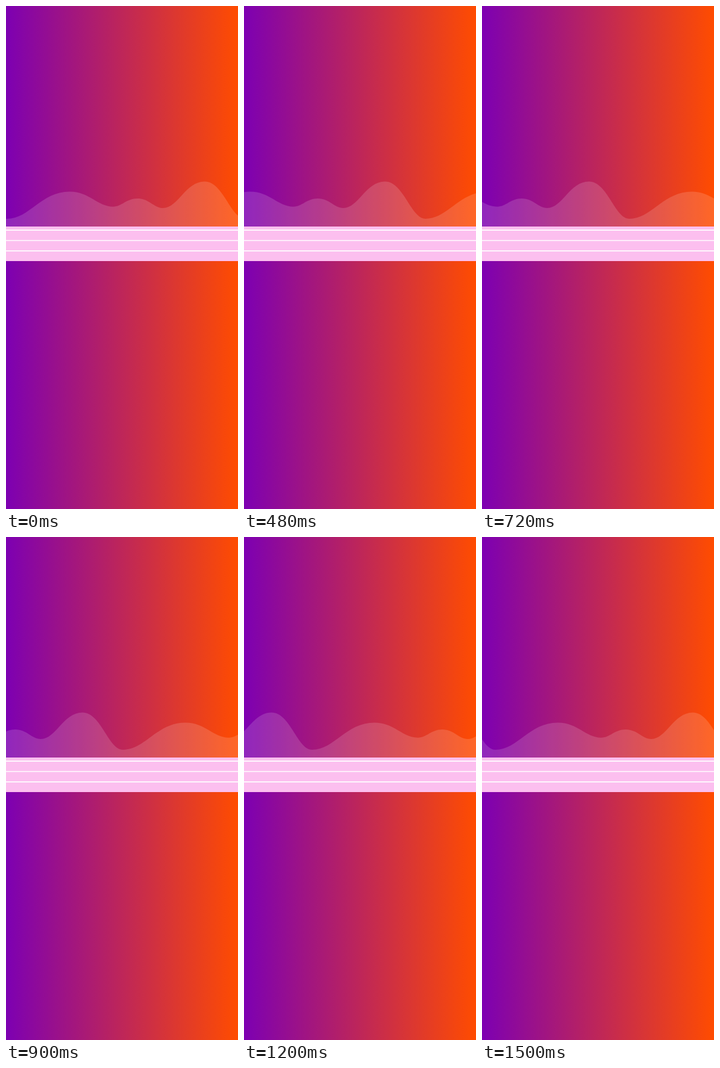
Recreate the animation shown at these times as an HTML page. Size 390 by 844 pixels, loop 1.56 s.

```html
<!DOCTYPE html>
<html lang="en">
<head>
<meta charset="utf-8">
<title>Wave</title>
<style>
  html, body { margin: 0; width: 100%; height: 100%; overflow: hidden; }
  svg { display: block; }
</style>
</head>
<body>
<svg width="390" height="844" viewBox="0 0 390 844">
  <defs>
    <linearGradient id="sky">
      <stop offset="0" stop-color="#7d00b2"/>
      <stop offset="1" stop-color="#ff4c00"/>
    </linearGradient>
  </defs>
  <rect width="390" height="844" fill="url(#sky)"/>
  <path id="wave" fill="#fff" fill-opacity=".15"/>
  <rect y="370" width="390" height="58" fill="#fcbfef"/>
  <path d="M0 376.1h390m-390 17.4h390m-390 17.4h390" stroke="#fff" stroke-width="1.6"/>
</svg>
<script>
const LOOP = 1560, STEP = 60;
const PERIOD = 400, BASE = 370;
const CREST = .46, TROUGH = .36; // handle length as a share of the span

// One period of the wave, troughs and crests in turn
const turns = [[2, 357], [107, 311.5], [180, 336.7], [221, 323], [264, 339], [334, 294.5]];

function wavePath() {
  let [x, y] = turns[0];
  let d = `M0 ${BASE}V${y}H${x}`;
  for (let i = 1; i <= 2 * turns.length; i++) {
    const [turnX, nextY] = turns[i % turns.length];
    const nextX = turnX + PERIOD * Math.floor(i / turns.length);
    const [out, into] = i % 2 ? [TROUGH, CREST] : [CREST, TROUGH];
    const span = nextX - x;
    d += `C${x + span * out} ${y} ${nextX - span * into} ${nextY} ${nextX} ${nextY}`;
    [x, y] = [nextX, nextY];
  }
  return d + `V${BASE}Z`;
}

// Slow start, gentle surges, faster finish
function distance(u) {
  return PERIOD * u - 29 * Math.sin(Math.PI * u) + 3.4 * Math.sin(4 * Math.PI * u);
}

const wave = document.getElementById('wave');
wave.setAttribute('d', wavePath());

function draw() {
  const step = Math.floor(performance.now() % LOOP / STEP);
  wave.setAttribute('transform', `translate(${-distance(step * STEP / LOOP)})`);
  requestAnimationFrame(draw);
}
draw();
</script>
</body>
</html>
```
